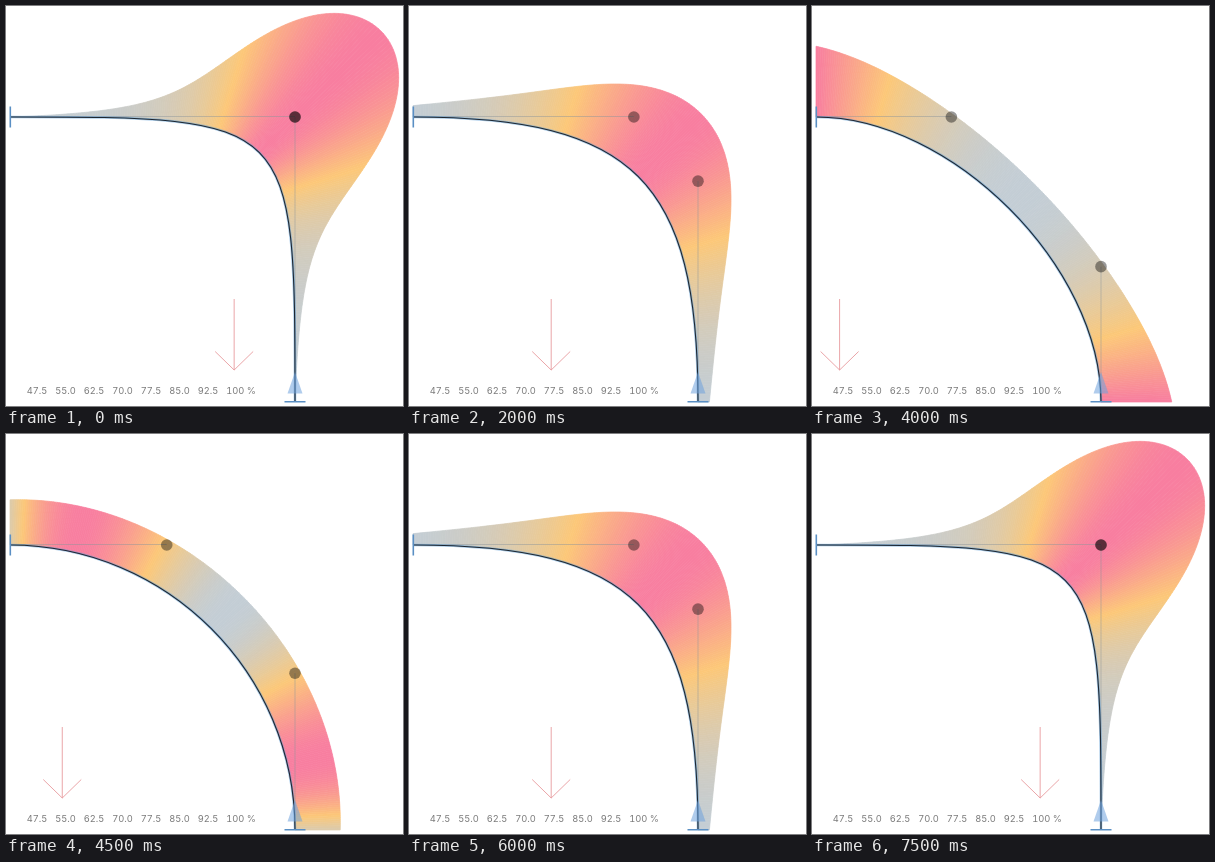
These frames come from a looping animation (397x400 px, 7.6 s). An HTML page:

```html
<!DOCTYPE html>
<html lang="en">
<head>
<meta charset="utf-8">
<title>Curvature comb</title>
<style>
  html, body { margin: 0; width: 100%; height: 100%; overflow: hidden; background: #fff; }
  svg { display: block; width: 100%; height: 100%; }
  text { font: 9.3px Inter, Roboto, sans-serif; font-variant-numeric: tabular-nums; fill: #7b7b7b; }
</style>
</head>
<body>
<svg viewBox="0 0 397 400">
  <g id="comb" stroke-width=".7" stroke-linejoin="round"></g>
  <path id="handles" fill="none" stroke="#8b939b" stroke-opacity=".6" stroke-width=".8"/>
  <path id="halo" fill="none" stroke="#5b9bd5" stroke-opacity=".5" stroke-width="2.6"/>
  <path id="curve" fill="none" stroke="#1c2733" stroke-width="1.1"/>
  <path d="M289 366L296.5 387.5H281.5Z" fill="#6fa3dc" fill-opacity=".55"/>
  <path d="M4.3 100.5V121.5M278.5 395.8H299.5" stroke="#5a8fc4" stroke-width="1.6"/>
  <g fill="#000" fill-opacity=".4">
    <circle id="dotA" r="5.8"/>
    <circle id="dotB" r="5.8"/>
  </g>
  <path id="arrow" d="M0 293V364M-19 345.5L0 364L19 345.5" fill="none" stroke="#e58f92" stroke-width=".8"/>
  <g id="labels"></g>
</svg>
<script>
const $ = id => document.getElementById(id);
const NS = 'http://www.w3.org/2000/svg';
const X0 = 4, Y0 = 111, SIZE = 285, TEETH = 260, SCALE = 45.6;
const LOOP = 7600, STEP = 500, LAST = 7;
const STOPS = [[195, 205, 213], [252, 200, 120], [248, 126, 160]];

const add = (parent, tag) => parent.appendChild(document.createElementNS(NS, tag));
const strips = Array.from({ length: TEETH }, () => add($('comb'), 'path'));
const percent = i => 47.5 + 7.5 * i;

for (let i = 0; i <= LAST; i++) {
  const label = add($('labels'), 'text');
  label.setAttribute('x', 20.7 + 28.5 * i);
  label.setAttribute('y', 387.6);
  label.textContent = i === LAST ? '100 %' : percent(i).toFixed(1);
}

function color(u) {
  const v = Math.min(1, Math.max(0, u)) * 2;
  const n = v < 1 ? 0 : 1;
  const mix = STOPS[n].map((c, j) => Math.round(c + (STOPS[n + 1][j] - c) * (v - n)));
  return `rgb(${mix})`;
}

// Point, outward tooth tip and curvature of the unit cubic with handle length k
function tooth(k, t) {
  const s = 1 - t, a = 3 * s * s * t, b = 3 * s * t * t, c = t * t * t;
  const x = a * k + b + c;
  const y = b * (1 - k) + c;
  const dx = 3 * (s * s * k + 2 * s * t * (1 - k));
  const dy = 3 * (2 * s * t * (1 - k) + t * t * k);
  const ddx = 6 * (s * (1 - 2 * k) + t * (k - 1));
  const ddy = 6 * (s * (1 - k) + t * (2 * k - 1));
  const speed = Math.hypot(dx, dy);
  const bend = (dx * ddy - dy * ddx) / speed ** 3;
  const len = SCALE * bend / speed;
  const px = X0 + SIZE * x, py = Y0 + SIZE * y;
  return { bend, foot: point(px, py), tip: point(px + dy * len, py - dx * len) };
}

function point(x, y) {
  return x.toFixed(2) + ' ' + y.toFixed(2);
}

function draw(i) {
  const k = percent(i) / 100;
  const teeth = Array.from({ length: TEETH + 1 }, (_, n) => tooth(k, n / TEETH));
  const bends = teeth.map(o => o.bend);
  const low = Math.min(...bends), range = Math.max(...bends) - low;

  strips.forEach((strip, n) => {
    const p = teeth[n], q = teeth[n + 1];
    const paint = color(((p.bend + q.bend) / 2 - low) / range);
    strip.setAttribute('d', `M${p.foot}L${p.tip}L${q.tip}L${q.foot}Z`);
    strip.setAttribute('fill', paint);
    strip.setAttribute('stroke', paint);
  });

  const right = X0 + SIZE, bottom = Y0 + SIZE;
  const hx = X0 + SIZE * k, hy = bottom - SIZE * k;
  const d = `M${X0} ${Y0}C${hx} ${Y0} ${right} ${hy} ${right} ${bottom}`;
  $('curve').setAttribute('d', d);
  $('halo').setAttribute('d', d);
  $('handles').setAttribute('d', `M${X0} ${Y0 - .5}H${hx}M${right} ${hy}V${bottom}`);
  $('dotA').setAttribute('cx', hx);
  $('dotA').setAttribute('cy', Y0);
  $('dotB').setAttribute('cx', right);
  $('dotB').setAttribute('cy', hy);
  $('arrow').setAttribute('transform', `translate(${27.6 + 28.65 * i} 0)`);
}

let shown = -1;
function frame(now) {
  const step = Math.max(0, Math.floor((now % LOOP) / STEP) - 1);
  const i = Math.abs(LAST - step);
  if (i !== shown) draw(shown = i);
  requestAnimationFrame(frame);
}
const start = performance.now();
frame(0);
function tick(now) { frame(Math.max(0, now - start)); }
</script>
</body>
</html>
```
